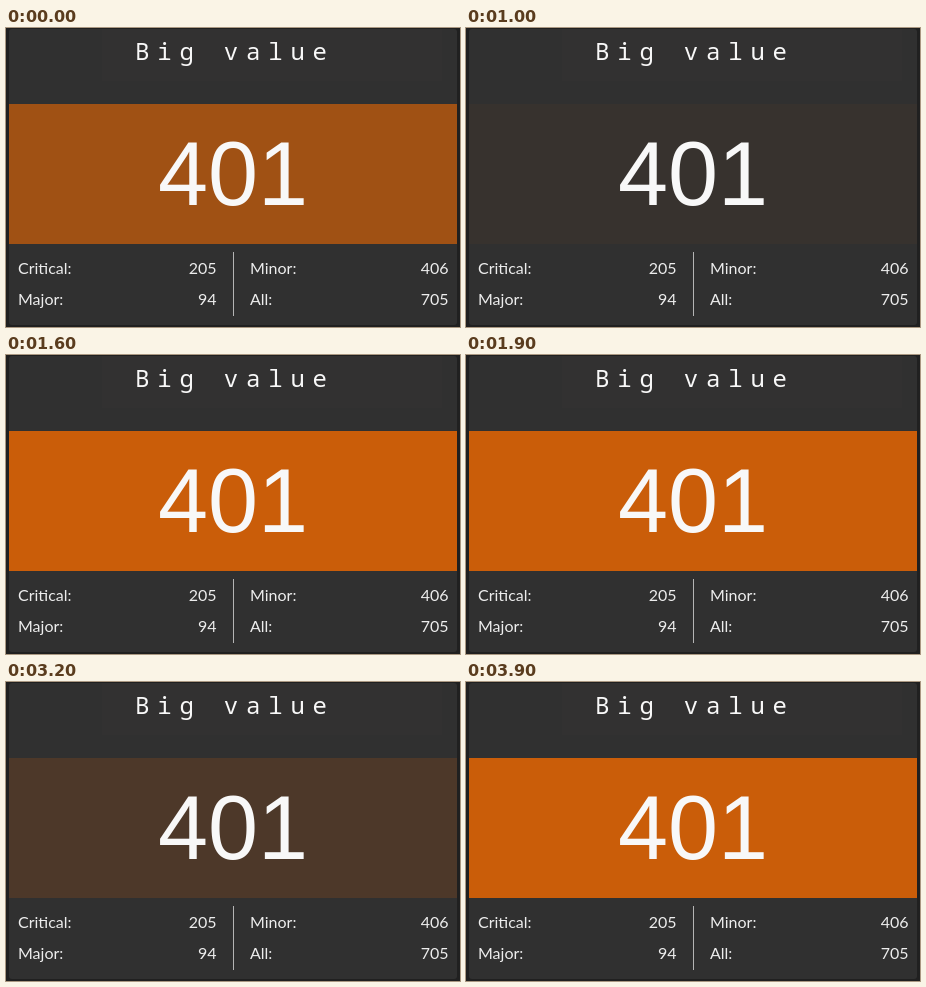
Animation, 454 px wide and 299 px high, one loop 4000 ms. Source, as an HTML page:

```html
<!DOCTYPE html>
<html lang="en">
<head>
<meta charset="utf-8">
<title>Big value tile</title>
<style>
  html, body { margin: 0; width: 100%; height: 100%; overflow: hidden; background: #202020; }
  svg { display: block; }
  text { fill: #f8f8f8; }
  .title { font: 24px "Noto Sans Mono", monospace; letter-spacing: 7.8px; }
  .value { font: 90px "Liberation Sans", Arial, sans-serif; text-anchor: middle; }
  .stats { font: 16px Lato, sans-serif; }
  .stats text { fill: #ededed; }
  .right { text-anchor: end; }
</style>
</head>
<body>
<svg width="454" height="299" viewBox="0 0 454 299">
  <rect x="3" y="1" width="448" height="296" rx="3" fill="#303030"/>
  <rect x="96" y="1" width="340" height="52" fill="#323131"/>
  <rect id="band" x="3" y="76" width="448" height="140"/>
  <text class="title" x="129" y="32">Big value</text>
  <text class="value" x="227" y="177">401</text>
  <rect x="227" y="224" width="1" height="64" fill="#b4b4b4"/>
  <g class="stats">
    <text x="12" y="246">Critical:</text><text class="right" x="210.5" y="246">205</text>
    <text x="12" y="277">Major:</text><text class="right" x="210.5" y="277">94</text>
    <text x="244" y="246">Minor:</text><text class="right" x="442.5" y="246">406</text>
    <text x="244" y="277">All:</text><text class="right" x="442.5" y="277">705</text>
  </g>
</svg>
<script>
const LOOP = 4000, STEP = 100, FADE = 1000, PEAK = 1750;
const dark = [48, 48, 48], orange = [237, 103, 0];
const band = document.getElementById('band');

const bezier = (s, a, b) => 3 * a * s * (1 - s) ** 2 + 3 * b * s * s * (1 - s) + s ** 3;

// CSS "ease": cubic-bezier(.25, .1, .25, 1)
function ease(x) {
  let lo = 0, hi = 1;
  for (let i = 0; i < 24; i++) {
    const mid = (lo + hi) / 2;
    if (bezier(mid, .25, .25) < x) lo = mid; else hi = mid;
  }
  return bezier(lo, .1, 1);
}

function draw(now) {
  const t = Math.floor((now % LOOP) / STEP) * STEP;
  const phase = ((t - PEAK + LOOP) % (2 * FADE)) / FADE;
  const fade = ease(phase < 1 ? phase : 2 - phase); // alternates direction
  const rgb = orange.map((c, i) => Math.round(c + (dark[i] - c) * fade));
  band.setAttribute('fill', `rgb(${rgb})`);
}

const start = performance.now();
function tick() {
  draw(performance.now() - start);
  requestAnimationFrame(tick);
}
tick();
</script>
</body>
</html>
```
